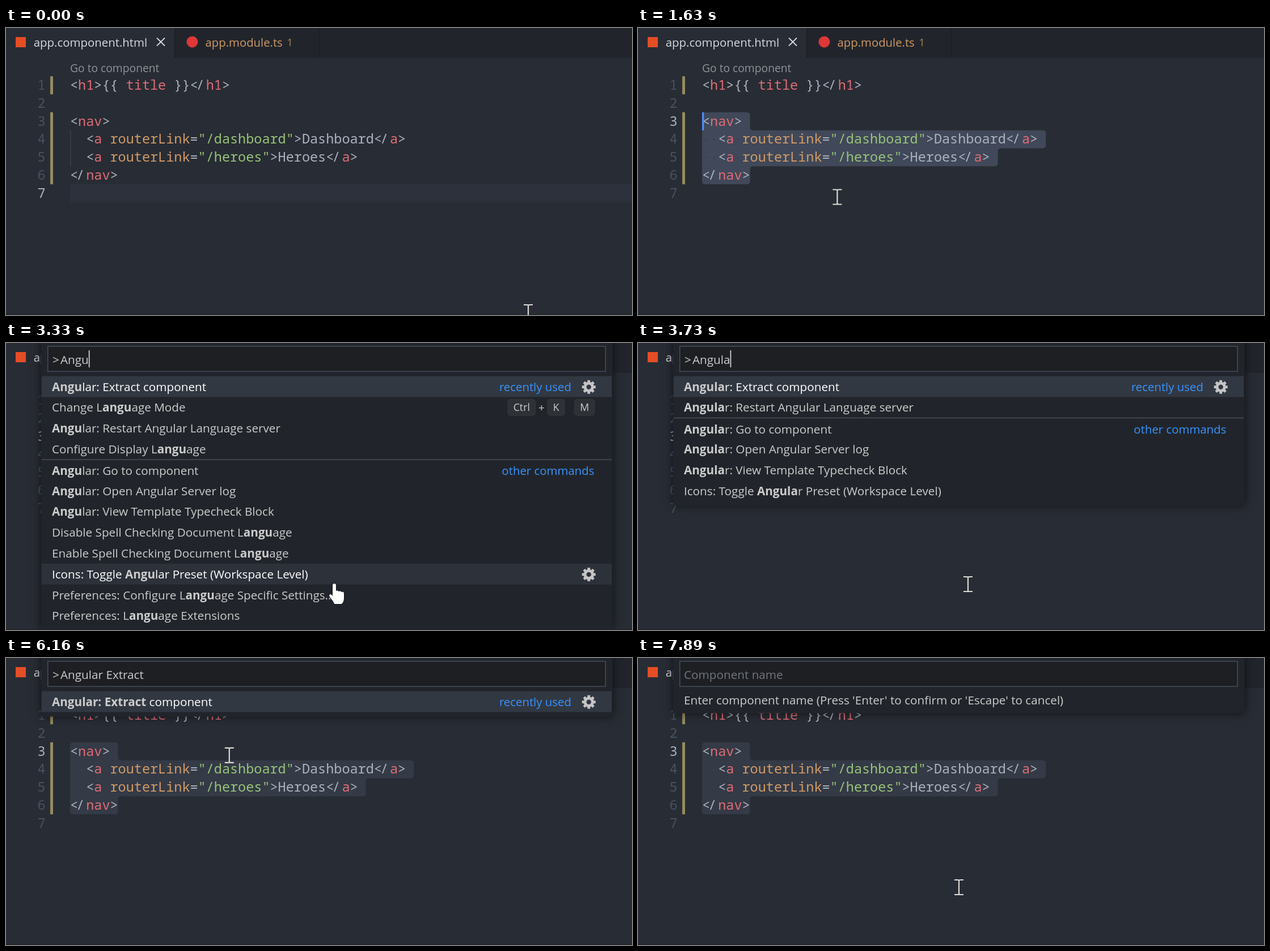
These frames come from a looping animation (1104 by 507 pixels, 8 s). An HTML page with a canvas:

```html
<!DOCTYPE html>
<html lang="en">
<head>
<meta charset="utf-8">
<title>Extract component</title>
<style>
html, body { margin: 0; height: 100%; overflow: hidden; background: #282c34; }
canvas { display: block; }
</style>
</head>
<body>
<canvas id="stage" width="1104" height="507"></canvas>
<script>
const g = document.getElementById('stage').getContext('2d');
const LOOP = 8000, OPEN = 2480, PROMPT = 6710, PRESS = 600, RELEASE = 1340;
const UI = '"Open Sans", "Noto Sans", sans-serif', MONO = '"Noto Sans Mono", "DejaVu Sans Mono", monospace';
const CODE_X = 113, CELL = 14.1, ROW = 36.8;
const colX = c => CODE_X + c * CELL, rowY = r => 85.3 + r * 31.8;
const clamp = (v, lo, hi) => Math.max(lo, Math.min(hi, v));

// Code lines: parts divided by "|", each starting with its colour key
const INK = { w: '#abb2bf', r: '#e06c75', o: '#d19a66', g: '#98c379' };
const LINES = [
  'w<|rh1|w>{{ |rtitle|w }}</|rh1|w>',
  '',
  'w<|rnav|w>',
  'w  <|ra |orouterLink|w=|g"/dashboard"|w>Dashboard</|ra|w>',
  'w  <|ra |orouterLink|w=|g"/heroes"|w>Heroes</|ra|w>',
  'w</|rnav|w>',
  ''
].map(line => line.split('|').flatMap(p => [...p.slice(1)].map(ch => [ch, INK[p[0]]])));

const RECENT = [
  ['Preferences: Open Workspace Settings (JSON)'],
  ['Angular: Extract component'],
  ['Preferences: Open Settings (JSON)'],
  ['Markdown: Create checkbox', 'Ctrl+Shift+C'],
  ['Preferences: File Icon Theme'],
  ['Developer: Reload Window', 'Ctrl+R'],
  ['Preferences: Color Theme', 'Ctrl+K Ctrl+T'],
  ['Material Icons: Configure Icon Packs'],
  ['Material Icons: Toggle Explorer Arrows'],
  ['Change Language Mode', 'Ctrl+K M'],
  ['Preferences: Product Icon Theme'],
  ['Help: Getting Started']
];
const MATCHES = [
  ['Angular: Extract component'],
  ['Change Language Mode', 'Ctrl+K M'],
  ['Angular: Restart Angular Language server'],
  ['Configure Display Language'],
  ['Angular: Go to component'],
  ['Angular: Open Angular Server log'],
  ['Angular: View Template Typecheck Block'],
  ['Disable Spell Checking Document Language'],
  ['Enable Spell Checking Document Language'],
  ['Icons: Toggle Angular Preset (Workspace Level)'],
  ['Preferences: Configure Language Specific Settings...'],
  ['Preferences: Language Extensions']
];
const ANGULAR = MATCHES.filter(m => m[0].includes('Angular'));

// Time at which the query reaches each length
const QUERY = 'Angular Extract';
const TYPED = [[3020, 1], [3100, 2], [3180, 3], [3330, 4], [3480, 5], [3730, 6], [3820, 7],
  [3970, 9], [4200, 10], [4430, 11], [4500, 12], [4670, 13], [4820, 14], [5140, 15]];

// Pointer path: time, x, y
const PATH = [[0, 921, 502], [70, 921, 502], [560, 197, 262], [640, 197, 262], [870, 170, 200],
  [1340, 22, 165], [1480, 22, 165], [1630, 350.5, 298], [1880, 582, 426], [5940, 582, 426],
  [6160, 394, 172], [6540, 325, 90], [7360, 325, 90], [7890, 566, 405], [8000, 566, 405]];

const HAND = new Path2D('M-6 2Q-6-1-3-1Q0-1 0 2V12Q3 10 5 13Q8 11 10 14Q14 12 14 17V25Q14 31 10 35H-3Q-4 31-10 24Q-13 20-11 18Q-9 17-6 21Z');
const ARROW = new Path2D('M0 0V27L6.5 21L11 31L15 29L10.5 19.5H19Z');
const BEAM = new Path2D('M-8-13H-2Q0-13 0-11Q0-13 2-13H8M0-11V11M-8 13H-2Q0 13 0 11Q0 13 2 13H8');

function rect(x, y, w, h, color) {
  g.fillStyle = color;
  g.fillRect(x, y, w, h);
}

function text(s, x, y, color, size = 20.7, align = 'left', weight = 400, family = UI) {
  g.font = `${weight} ${size}px ${family}`;
  g.textAlign = align;
  g.fillStyle = color;
  g.fillText(s, x, y);
  return g.measureText(s).width;
}

function line(color, width, ...pts) {
  g.strokeStyle = color;
  g.lineWidth = width;
  g.beginPath();
  for (let i = 0; i < pts.length; i += 4) {
    g.moveTo(pts[i], pts[i + 1]);
    g.lineTo(pts[i + 2], pts[i + 3]);
  }
  g.stroke();
}

function pointerAt(t) {
  const i = PATH.findIndex(p => p[0] > t), [t0, x0, y0] = PATH[i - 1], [t1, x1, y1] = PATH[i];
  const k = (t - t0) / (t1 - t0);
  return { x: x0 + (x1 - x0) * k, y: y0 + (y1 - y0) * k };
}

function caretAt(t, p) {
  if (t < PRESS) return { row: 6, col: 0 };
  if (t >= RELEASE) return { row: 2, col: 0 };
  const row = clamp(Math.floor((p.y - rowY(0)) / 31.8), 2, 5);
  return { row, col: clamp(Math.round((p.x - CODE_X) / CELL), 0, LINES[row].length) };
}

// Selection from the caret to the end of the sixth line
function drawSelection({ row, col }, color) {
  const pts = [[colX(col), rowY(row)]];
  for (let r = row; r < 6; r++) {
    const right = colX(LINES[r].length + (r < 5 ? 1 : 0));
    pts.push([right, rowY(r)], [right, rowY(r + 1)]);
  }
  if (row === 5) pts.push([colX(col), rowY(6)]);
  else {
    pts.push([CODE_X, rowY(6)]);
    if (col) pts.push([CODE_X, rowY(row + 1)], [colX(col), rowY(row + 1)]);
  }
  const n = pts.length;
  g.beginPath();
  g.moveTo((pts[0][0] + pts[1][0]) / 2, pts[0][1]);
  for (let i = 1; i <= n; i++) g.arcTo(...pts[i % n], ...pts[(i + 1) % n], 5);
  g.closePath();
  g.fillStyle = color;
  g.fill();
  g.fillStyle = '#3b4048';
  for (let r = row; r < 6; r++) LINES[r].forEach(([ch], c) => {
    if (ch === ' ' && (r > row || c >= col)) g.fillRect(colX(c) + 5.5, rowY(r) + 15, 3, 3);
  });
}

function drawTabs() {
  rect(297, 0, 807, 53, '#21252b');
  rect(297, 0, 1, 53, '#181a1f');
  rect(551.5, 0, 1, 53, '#181a1f');
  rect(17, 16, 18, 18, '#e44d26');
  g.fillStyle = '#dd3737';
  g.beginPath();
  g.arc(328.5, 24.5, 10, 0, 7);
  g.fill();
  text('app.component.html', 48.7, 32.5, '#d7dae0', 20.4);
  text('app.module.ts', 351.5, 32.5, '#d19a66', 20.3);
  text('1', 495.5, 32, '#b0835a', 18);
  line('#d7dae0', 1.8, 266, 17.5, 280, 31.5, 280, 17.5, 266, 31.5);
}

function drawEditor(t, p) {
  const caret = caretAt(t, p), selected = t >= PRESS && (caret.row < 5 || caret.col < 6);
  if (!selected) rect(CODE_X, rowY(caret.row), 991, 31.8, '#2c313c');
  rect(113, rowY(3), 1.5, 63.6, '#3b4048');
  if (selected) drawSelection(caret, t < OPEN ? '#404859' : '#343a46');
  text('Go to component', 113, 78, '#8f9297', 19.25);
  rect(78, rowY(0), 5, 31.8, '#948b60');
  rect(78, rowY(2), 5, 127.2, '#948b60');
  LINES.forEach((chars, r) => {
    const y = rowY(r) + 23.7;
    text(r + 1, 69.5, y, r === caret.row ? '#abb2bf' : '#495162', 23.5, 'right', 400, MONO);
    chars.forEach(([ch, color], c) => {
      const closing = ch === '/' && chars[c - 1][0] === '<';
      text(ch, colX(c) - (closing ? 3 : 0), y, color, 23.5, 'left', 400, MONO);
    });
  });
  if (t >= PRESS && t < 2260) rect(colX(caret.col), rowY(caret.row), 3.3, 31.8, '#528bff');
}

function drawGear(y) {
  g.save();
  g.translate(1027.8, y);
  g.strokeStyle = '#c5c5c5';
  g.lineWidth = 5;
  g.beginPath();
  g.arc(0, 0, 6.7, 0, 7);
  g.stroke();
  for (let i = 0; i < 8; i++) {
    line('#c5c5c5', 4.8, 0, -8, 0, -12);
    g.rotate(Math.PI / 4);
  }
  g.restore();
}

// Shortcut keys laid out from the right edge
function drawKeys(keys, right, y, color) {
  for (const chord of keys.split(' ').reverse()) {
    chord.split('+').reverse().forEach((key, i) => {
      if (i) text('+', right + 10.7, y + 7, color, 19, 'center');
      g.font = `17.8px ${UI}`;
      const w = g.measureText(key).width + 19.5;
      g.beginPath();
      g.roundRect(right - w, y - 14.5, w, 29, 5);
      g.fillStyle = 'rgba(128,128,128,.14)';
      g.fill();
      g.strokeStyle = 'rgba(128,128,128,.12)';
      g.lineWidth = 1;
      g.stroke();
      text(key, right - w / 2, y + 6.5, color, 17.8, 'center');
      right -= w + 21.4;
    });
    right += 4.4;
  }
}

function drawRow([label, keys], i, split, query, hover) {
  const y = 77 + ROW * i, active = i === 0 || hover;
  if (active) rect(63, y - 18.4, 1005, ROW, i ? '#2c313a' : '#323842');
  const color = active ? '#ffffff' : '#cccccc';
  const base = y + 7.5 + (i === split ? 1.5 : 0);
  const key = query.replace(' ', ': '), at = label.toLowerCase().indexOf(key.toLowerCase());
  const from = Math.max(at, 0), to = at < 0 ? 0 : at + key.length;
  let x = 81;
  x += text(label.slice(0, from), x, base, color);
  x += text(label.slice(from, to), x, base, '#cccccc', 20.7, 'left', 700);
  text(label.slice(to), x, base, color);
  if (i === 0) text('recently used', 997, base, '#3794ff', 20.4, 'right');
  if (i === split) {
    rect(63, y - 19, 1005, 1.5, '#4a4f58');
    text('other commands', 1037.5, base, '#3794ff', 20.4, 'right');
  }
  if (keys) drawKeys(keys, active ? 997 : 1038, y, color);
  if (active) drawGear(y + 0.7);
}

function drawPanel(bottom) {
  g.save();
  g.shadowColor = 'rgba(0,0,0,.6)';
  g.shadowBlur = 16;
  rect(62, -20, 1007.5, bottom + 20, '#21252b');
  g.restore();
  rect(73, 5, 985, 46, '#464c5a');
  rect(74.5, 6.5, 982, 43, '#1d1f23');
}

function drawPalette(t, p) {
  const query = QUERY.slice(0, (TYPED.findLast(s => s[0] <= t) || [0, 0])[1]);
  const rows = !query ? RECENT : t < 3580 ? MATCHES : t < 3970 ? ANGULAR : ANGULAR.slice(0, 1);
  const split = rows === MATCHES ? 4 : rows === ANGULAR ? 2 : -1;
  const over = Math.floor((p.y - 58.6) / ROW), onList = over >= 0 && over < rows.length;
  drawPanel(58.6 + rows.length * ROW + 8);
  text('>', 82, 37, '#cccccc');
  const end = 96 + text(query, 96, 37, '#cccccc');
  if (t < 5690 || (t >= 6190 && t < 6690)) rect(end, 13, 1.7, 30, '#d7dae0');
  rows.forEach((r, i) => drawRow(r, i, split, query, i === over));
  return onList ? 'hand' : 'beam';
}

function drawPrompt(t, p) {
  drawPanel(97.5);
  text('Component name', 81, 37, '#72767e');
  text("Enter component name (Press 'Enter' to confirm or 'Escape' to cancel)", 81, 81.5, '#cccccc');
  if (t >= 6950 && t < 7430) rect(81.5, 13, 1.7, 30, '#d7dae0');
  return p.y > 97 ? 'beam' : t < 6800 ? 'hand' : 'arrow';
}

function drawPointer(kind, p) {
  g.save();
  g.translate(p.x, p.y);
  if (kind === 'beam') {
    g.strokeStyle = '#dcdcd4';
    g.lineWidth = 2.2;
    g.stroke(BEAM);
  } else {
    const shape = kind === 'hand' ? HAND : ARROW;
    g.strokeStyle = '#15171b';
    g.lineWidth = 2;
    g.stroke(shape);
    g.fillStyle = '#ffffff';
    g.fill(shape);
  }
  g.restore();
}

function draw(t) {
  const p = pointerAt(t);
  rect(0, 0, 1104, 507, '#282c34');
  drawTabs();
  drawEditor(t, p);
  const kind = t < OPEN ? 'beam' : t < PROMPT ? drawPalette(t, p) : drawPrompt(t, p);
  rect(0, 505.5, 1104, 1.5, '#20242a');
  drawPointer(kind, p);
}

const start = performance.now();
function frame() {
  draw((performance.now() - start) % LOOP);
  requestAnimationFrame(frame);
}
frame();
</script>
</body>
</html>
```
